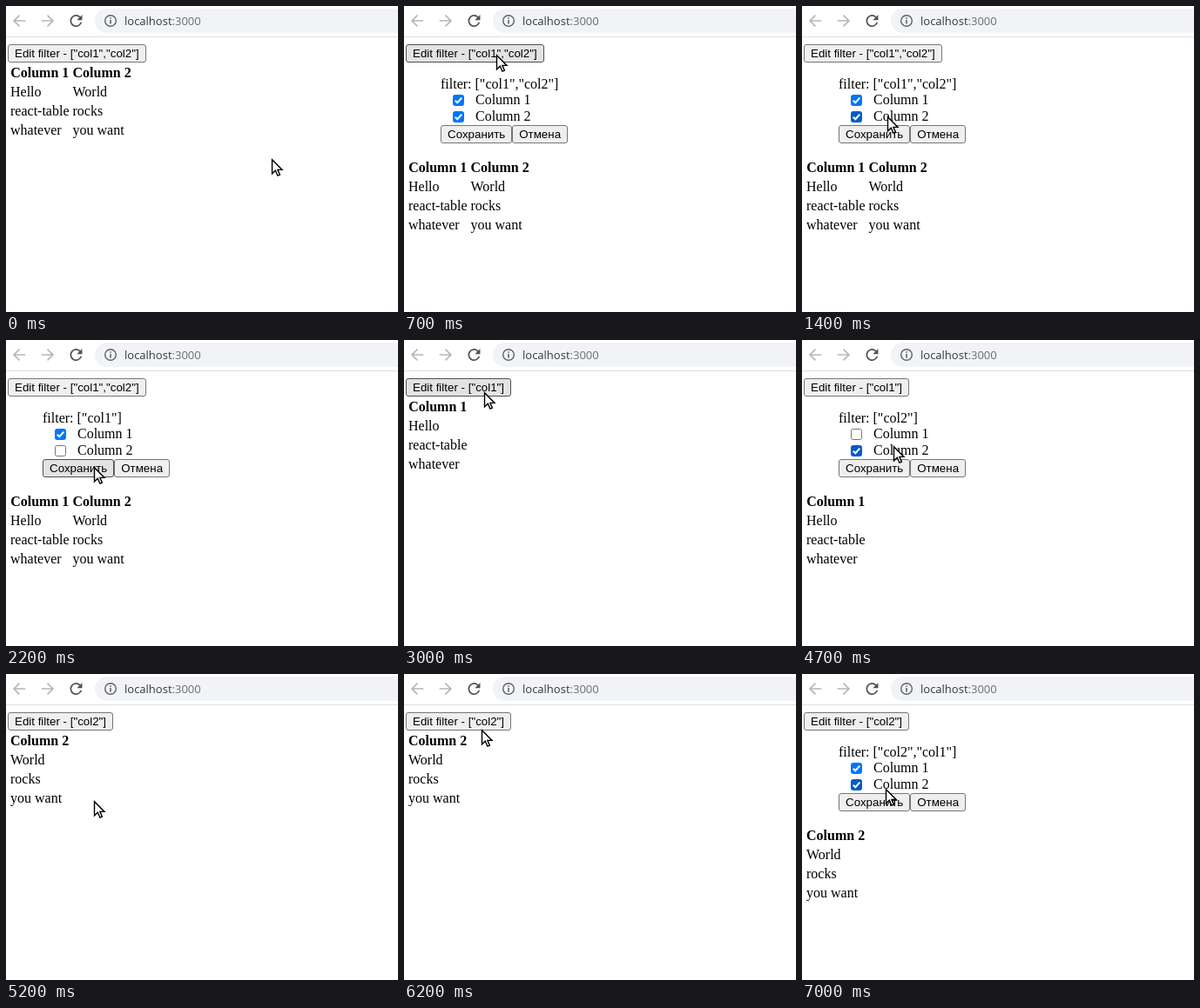
Animation, 450 px wide and 352 px high, one loop 7.1 s. Source, as an HTML page:

```html
<!DOCTYPE html>
<html lang="en">
<head>
<meta charset="utf-8">
<title>Column filter</title>
<style>
  html, body { margin: 0; width: 100%; height: 100%; overflow: hidden; background: #fff; }
  body { position: relative; font: 16px/18px "Liberation Serif", "Times New Roman", serif; color: #000; cursor: default; }
  svg { display: block; }
  #bar { position: absolute; left: 0; top: 0; }
  #url { position: absolute; left: 136px; top: 8px; font: 13px/18px "Open Sans", sans-serif; color: #36393d; white-space: pre; }
  #url span { color: #6b6f74; }
  #page { position: absolute; left: 2px; top: 44px; white-space: nowrap; }
  .button { box-sizing: border-box; display: block; width: max-content; height: 21px; padding: 0 7px;
    border: 1px solid #767676; border-radius: 3px; background: #efefef;
    font: 13.333px/19px "Liberation Sans", Arial, sans-serif; white-space: pre; }
  .button.hover { background: #e3e3e3; border-color: #4f4f4f; }
  #panel { margin: 16px 0 16px 40px; }
  .row { position: relative; width: 104px; height: 19px; padding-left: 40px; box-sizing: border-box; }
  .row svg { position: absolute; left: 14px; top: 3px; }
  .box { fill: #fff; stroke: #767676; }
  .tick { fill: none; stroke: none; stroke-width: 2; }
  .checked .box { fill: #0075ff; stroke: #0075ff; }
  .checked .tick { stroke: #fff; }
  .hover .box { stroke: #4f4f4f; }
  .checked.hover .box { fill: #005cc8; stroke: #005cc8; }
  #actions { display: flex; }
  table { border-spacing: 2px; }
  td, th { padding: 1px; }
  #cursor { position: absolute; left: 0; top: -1px; pointer-events: none; overflow: visible; }
</style>
</head>
<body>
<svg id="bar" width="450" height="36" fill="none">
  <defs><path id="arrow" d="M8 0H-7M0 -7.5L-7.5 0L0 7.5" stroke="#b4b7ba" stroke-width="2"/></defs>
  <path d="M0 35.5H450" stroke="#dcdee1"/>
  <rect x="102" y="3" width="380" height="28" rx="14" fill="#f1f3f4"/>
  <use href="#arrow" transform="translate(15.5 17) scale(.85)"/>
  <use href="#arrow" transform="translate(47.5 17) scale(-.85 .85)"/>
  <path transform="translate(80.5 17) scale(.87)" fill="#505357"
    d="M5.6 -5.6A8 8 0 1 0 7.7 2H5.6A6 6 0 1 1 4.2 -4.2L1 -1H8V-8Z"/>
  <circle cx="120" cy="17" r="6.3" stroke="#5f6368" stroke-width="1.4"/>
  <path d="M120 16V20.5M120 13.2V14.8" stroke="#5f6368" stroke-width="1.6"/>
</svg>
<div id="url">localhost<span>:3000</span></div>
<div id="page">
  <div id="edit" class="button hot"></div>
  <div id="panel">
    <div id="draft"></div>
    <div id="rows"></div>
    <div id="actions"><div class="button hot">Сохранить</div><div class="button hot">Отмена</div></div>
  </div>
  <table id="table"></table>
</div>
<svg id="cursor" width="13" height="20">
  <path d="M.5 .7V16.8L4.3 13.3L6.9 19.2L9.4 18.1L6.9 12.4H12Z" fill="#fff" stroke="#000" stroke-width="1.4"/>
</svg>
<script>
const LOOP = 7100, STEP = 100;
const TRAVEL = 600, PAUSE = 200; // the pointer sets off and settles this long before a click

const columns = {
  1: ['Column 1', 'Hello', 'react-table', 'whatever'],
  2: ['Column 2', 'World', 'rocks', 'you want']
};

const open = s => ({ ...s, draft: s.applied });
const save = s => ({ applied: s.draft, draft: null });
const toggle = n => s => ({
  ...s,
  draft: s.draft.includes(n) ? s.draft.filter(m => m !== n) : [...s.draft, n]
});

const home = { at: 0, x: 305, y: 177 };
const clicks = [
  { at: 600, x: 106, y: 57, act: open },
  { at: 1500, x: 98, y: 128, act: toggle(2) },
  { at: 2400, x: 101, y: 147, act: save },
  { at: 3200, x: 92, y: 61, act: open },
  { at: 4100, x: 102, y: 128, act: toggle(2) },
  { at: 4500, x: 107, y: 108, act: toggle(1) },
  { at: 5200, x: 101, y: 147, act: save },
  { at: 6300, x: 89, y: 65, act: open },
  { at: 6700, x: 96, y: 108, act: toggle(1) },
  { at: 7200, x: 96, y: 133, act: save }
];

const $ = id => document.getElementById(id);
const filterText = list => JSON.stringify(list.map(n => 'col' + n));

$('rows').innerHTML = [1, 2].map(n => `<div class="row hot">
  <svg width="13" height="13"><rect class="box" x=".5" y=".5" width="12" height="12" rx="2"/>
  <path class="tick" d="M2.8 6.7L5.3 9.2L10.3 3.6"/></svg>${columns[n][0]}</div>`).join('');
const rows = [...document.querySelectorAll('.row')];
const hot = [...document.querySelectorAll('.hot')];

function showState({ applied, draft }) {
  $('edit').textContent = 'Edit filter - ' + filterText(applied);
  $('panel').style.display = draft ? 'block' : 'none';
  if (draft) {
    $('draft').textContent = 'filter: ' + filterText(draft);
    rows.forEach((row, i) => row.classList.toggle('checked', draft.includes(i + 1)));
  }
  $('table').innerHTML = columns[1].map((_, i) => {
    const tag = i ? 'td' : 'th';
    return '<tr>' + applied.map(n => `<${tag}>${columns[n][i]}</${tag}>`).join('') + '</tr>';
  }).join('');
}

function pointerAt(t) {
  const next = clicks.findIndex(c => c.at > t);
  const from = clicks[next - 1] || home, to = clicks[next];
  const start = Math.max(from.at, to.at - TRAVEL), end = to.at - PAUSE;
  const u = Math.min(1, Math.max(0, (t - start) / (end - start)));
  const k = Math.sin(u * Math.PI / 2);
  return [from.x + (to.x - from.x) * k, from.y + (to.y - from.y) * k].map(Math.round);
}

function draw(t) {
  const done = clicks.filter(c => c.at <= t);
  showState(done.reduce((s, c) => c.act(s), { applied: [1, 2], draft: null }));
  const [x, y] = pointerAt(t);
  $('cursor').style.transform = `translate(${x}px, ${y}px)`;
  const under = document.elementFromPoint(x, y);
  hot.forEach(el => el.classList.toggle('hover', el.contains(under)));
}

const began = performance.now();
let shown;
function tick() {
  const elapsed = Math.max(0, performance.now() - began) % LOOP;
  const t = Math.floor(elapsed / STEP) * STEP;
  if (t !== shown) draw(shown = t);
  requestAnimationFrame(tick);
}
tick();
</script>
</body>
</html>
```
